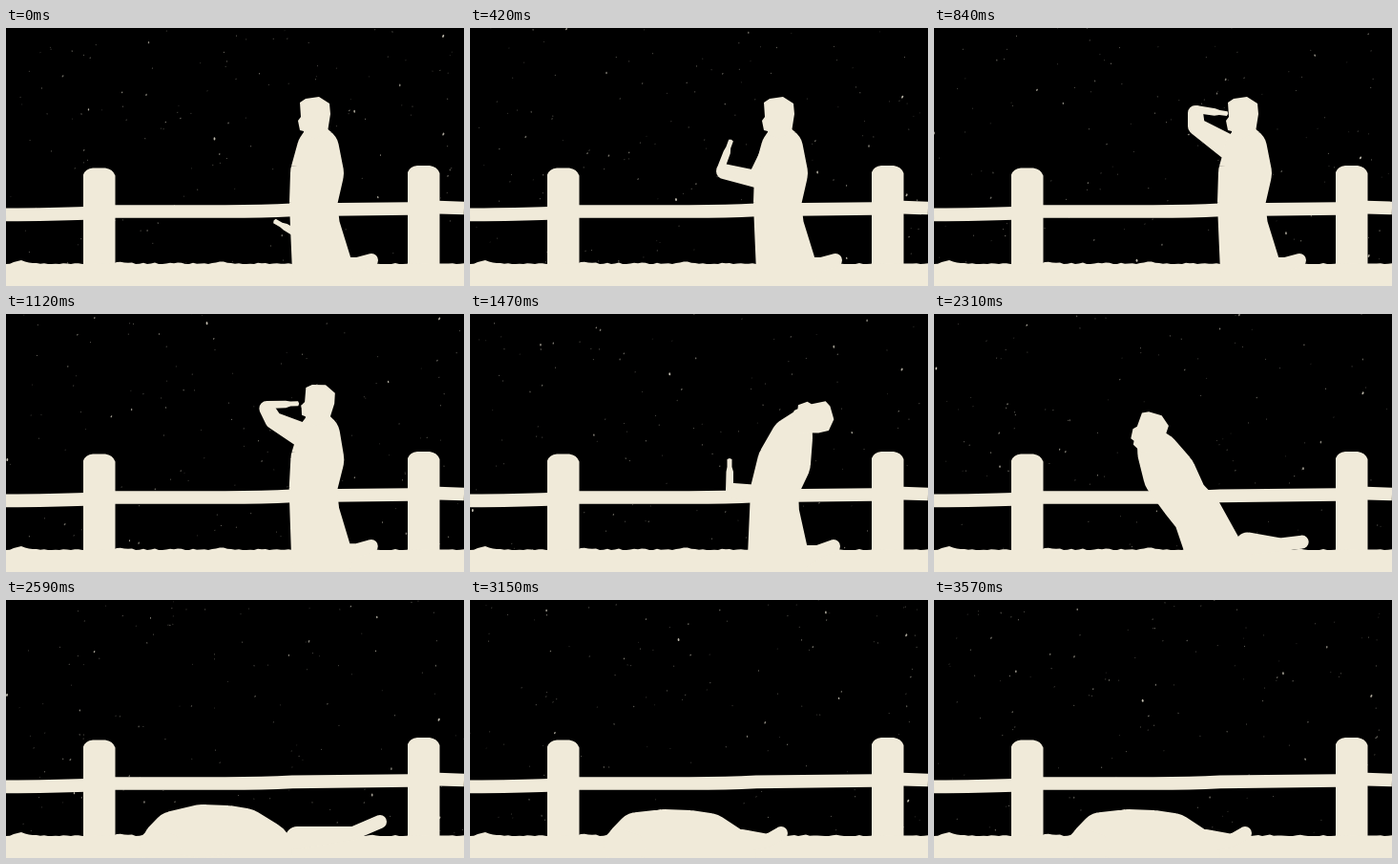
Animation of 480 by 270 pixels, one loop 3.64 s. Source, as an HTML page:

```html
<!DOCTYPE html>
<html lang="en">
<head>
<meta charset="utf-8">
<title>Night at the fence</title>
<style>
  html, body { margin: 0; width: 100%; height: 100%; overflow: hidden; background: #000; }
  svg { display: block; width: 100vw; height: 100vh; }
</style>
</head>
<body>
<svg id="stage" viewBox="0 0 480 270">
  <rect width="480" height="270" fill="#000"/>
  <g id="snow" fill="#f0ead9"></g>
  <g fill="none" stroke="#f0ead9" stroke-width="13.7">
    <path d="M0 195.300Q50 195 83 193.800"/>
    <path d="M112 192H230Q270 192 300 190.300L424 189"/>
    <path d="M453 187.700L480 188.500"/>
  </g>
  <g fill="#f0ead9">
    <path id="posts"/>
    <path id="ground"/>
    <path id="arm"/>
    <path id="bottle" d="M0 -8L20 -7.500L25 -6.500H33L34 -4L33 -1.500H25L20 0H0Z"/>
    <path id="body"/>
    <path id="head" d="M-11 20L-12 16L-16 15L-18 5L-15 1L-16 -14L-10 -18L4 -20L15 -13L16 -2L13 17L0 24Z"/>
  </g>
</svg>
<script>
const LOOP = 3640, STEP = 70, TURN = 2 * Math.PI;
const KNEE = [288, 250];
const SPINE_R = [32, 26, 25, 28, 22, 12.5], LEG_R = [12, 7, 7], ARM_R = [13, 9, 8];

const $ = id => document.getElementById(id);
const fmt = p => p.map(v => v.toFixed(2)).join(' ');
let seed = 41;
const rand = () => (seed = seed * 16807 % 2147483647) / 2147483647;

// Joints are kept as angle and radius around the knees, so the body swings over them.
const joints = text => text.split(' ').map(pair => {
  const [x, y] = pair.split(',').map(Number);
  const dx = x - KNEE[0], dy = y - KNEE[1], angle = Math.atan2(dy, dx);
  return [angle > 2.8 ? angle - TURN : angle, Math.hypot(dx, dy)];
});
const place = ([a, r]) => [KNEE[0] + r * Math.cos(a), KNEE[1] + r * Math.sin(a)];

// Spine from hips to neck; calf, ankle, foot; head and its tilt.
const figure = (spine, leg, head, tilt) => [...joints(`${spine} ${leg} ${head}`), [tilt]];
const kneel = figure('332,254 324,208 322,183 326,152 327,126 325,112', '355,252 368,247 383,243', '324,92', 0);
const reel = figure('323,254 319,208 319,184 329,156 337,130 346,113', '348,254 364,249 381,243', '361,109', 82);
const sway = figure('316,250 303,210 295,184 298,155 302,132 306,110', '340,232 362,240 382,242', '319,105', 82);
const land = figure('268,262 250,244 232,240 205,242 175,243 158,247', '305,249 364,244 392,232', '160,256', -80);
const rest = figure('268,268 250,249 230,245 203,247 175,244 158,248', '285,252 312,252 326,244', '160,256', -80);

// Shoulder, elbow, hand; direction of the bottle.
const reach = (arm, aim) => [...joints(arm), [aim]];
const low = reach('322,130 328,170 312,215', 210);
const lift = reach('318,130 300,158 266,150', 290);
const sip = reach('308,124 275,103 274,89', 368);
const lean = reach('325,150 303,188 276,185', 270);
const hang = reach('300,150 300,190 300,225', 270);
const flat = reach('185,242 210,245 240,246', 180);

const smooth = u => u * u * (3 - 2 * u);
const drop = u => u * u;

// Each key: time, pose, easing towards it.
const figureKeys = [[0, kneel], [1050, kneel], [1400, reel], [1540, reel],
  [2030, sway], [2100, sway], [2450, land, drop], [2590, land], [2870, rest]];
const armKeys = [[0, low], [70, low], [420, lift], [770, sip], [1050, sip],
  [1400, lean], [1540, lean], [1960, hang], [2100, hang], [2450, flat, drop]];

function track(keys, t) {
  const n = keys.findIndex(key => key[0] > t);
  if (n < 0) return keys[keys.length - 1][1];
  const [t0, from] = keys[n - 1], [t1, to, ease = smooth] = keys[n];
  const u = ease((t - t0) / (t1 - t0));
  return from.map((p, i) => p.map((v, j) => v + (to[i][j] - v) * u));
}

// Circles joined by their outer tangents.
function limb(pts, radii) {
  return pts.map((p, i) => {
    const r = radii[i], q = pts[i + 1], s = radii[i + 1];
    let d = `M${fmt([p[0] - r, p[1]])}a${r} ${r} 0 1 0 ${2 * r} 0a${r} ${r} 0 1 0 ${-2 * r} 0Z`;
    if (!q) return d;
    const dx = q[0] - p[0], dy = q[1] - p[1], gap = Math.hypot(dx, dy);
    if (gap <= Math.abs(r - s)) return d;
    const dir = Math.atan2(dy, dx), open = Math.acos((r - s) / gap);
    const rim = (c, k, side) => fmt([c[0] + k * Math.cos(dir + side * open), c[1] + k * Math.sin(dir + side * open)]);
    return d + `M${rim(p, r, 1)}L${rim(q, s, 1)}L${rim(q, s, -1)}L${rim(p, r, -1)}Z`;
  }).join('');
}

const post = (x, top) => `M${x} 250V${top + 7}q2 -6 10 -7h13q8 1 10.500 8V250Z`;
$('posts').setAttribute('d', post(81, 146.5) + post(421, 144));

const bump = (x, at, height, width) => height * Math.exp(-(((x - at) / width) ** 2));
let soil = 'M0 270';
for (let x = 0; x <= 480; x += 4) {
  const y = 247 - 1.5 * rand() ** 2 - bump(x, 15, 3, 5) - bump(x, 120, 2, 6) - bump(x, 228, 1.5, 8);
  soil += `L${x} ${y.toFixed(1)}`;
}
$('ground').setAttribute('d', soil + 'V270Z');

const flakes = Array.from({ length: 160 }, () => {
  const big = rand() ** 6;
  const el = document.createElementNS('http://www.w3.org/2000/svg', 'ellipse');
  el.setAttribute('rx', 0.4 + big * 0.6);
  el.setAttribute('ry', 0.6 + big * 1.1);
  el.setAttribute('opacity', 0.2 + 0.35 * rand() + 0.4 * big);
  $('snow').append(el);
  return { el, x: rand() * 480, y: rand() * 276, falls: rand() < 0.3 + big ? 2 : 1,
    sway: 3 + rand() * 9, phase: rand() * TURN, lean: rand() * 50 - 15 };
});

const pose = (id, at, angle) => $(id).setAttribute('transform', `translate(${fmt(at)}) rotate(${angle})`);

function draw(t) {
  const turn = t / LOOP;
  for (const f of flakes) {
    const x = f.x + f.sway * Math.sin(turn * TURN + f.phase);
    const y = (f.y + turn * 276 * f.falls) % 276 - 3;
    f.el.setAttribute('transform', `translate(${fmt([x, y])}) rotate(${f.lean})`);
  }
  const now = track(figureKeys, t), [tilt] = now.pop === undefined ? [0] : now[now.length - 1];
  const pts = now.slice(0, -1).map(place);
  $('body').setAttribute('d', limb(pts.slice(0, 6), SPINE_R) + limb(pts.slice(6, 9), LEG_R));
  pose('head', pts[9], tilt);

  const reachNow = track(armKeys, t), arm = reachNow.slice(0, 3).map(place);
  $('arm').setAttribute('d', limb(arm, ARM_R));
  pose('bottle', arm[2], reachNow[3][0]);
}

const start = performance.now();
function tick() {
  const t = (performance.now() - start) % LOOP;
  draw(Math.floor(t / STEP) * STEP);
  requestAnimationFrame(tick);
}
draw(0);
requestAnimationFrame(tick);
</script>
</body>
</html>
```
